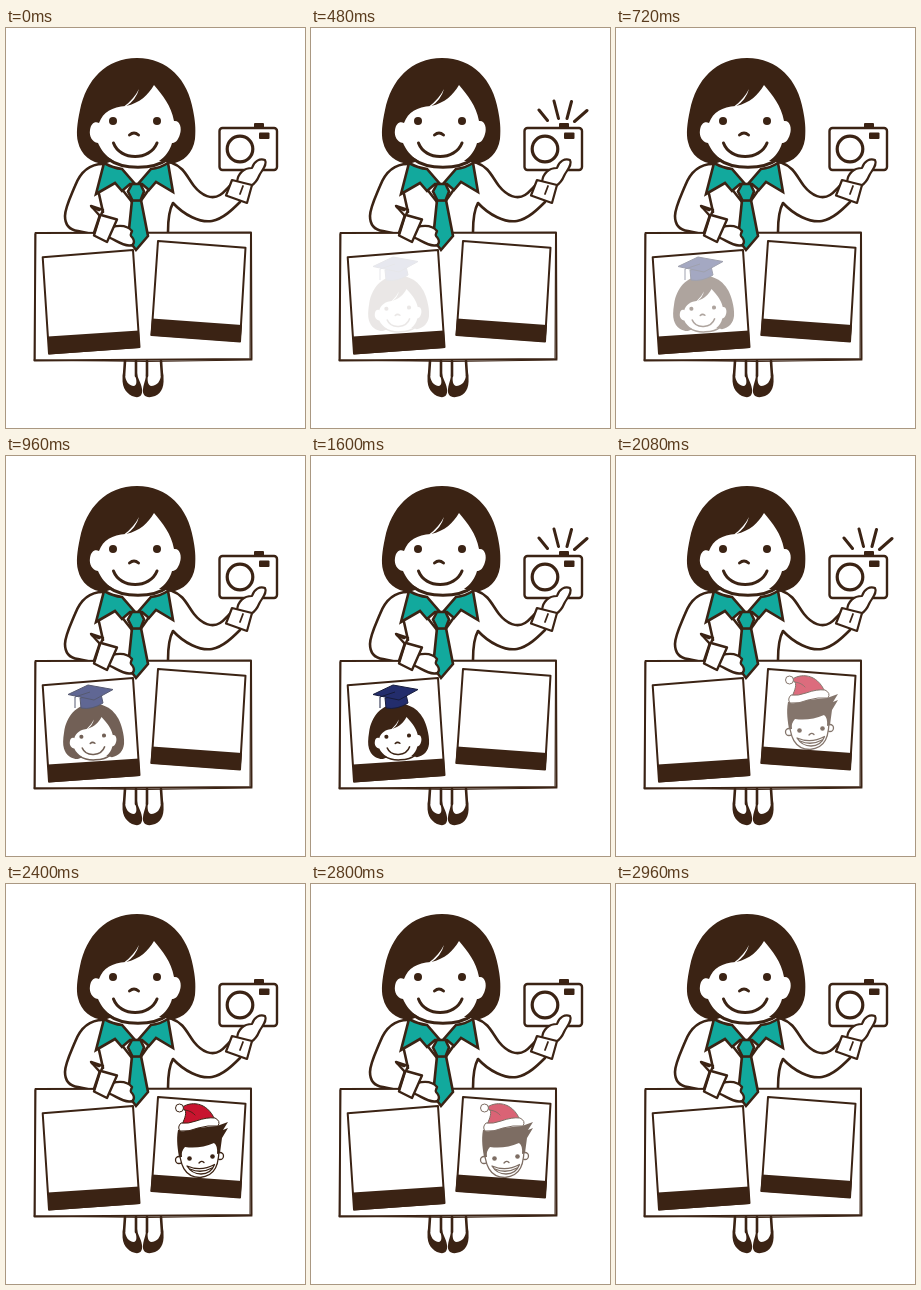
Recreate the animation shown at these times as an HTML page. Size 299x400 px, loop 3.04 s.

```html
<!DOCTYPE html>
<html lang="en">
<head>
<meta charset="utf-8">
<title>Photo booth</title>
<style>
  html, body { margin: 0; width: 100%; height: 100%; overflow: hidden; background: #fff; }
  svg { display: block; width: 299px; height: 400px; }
  .line { fill: none; stroke: #3b2314; stroke-width: 2.6; stroke-linecap: round; stroke-linejoin: round; }
  .sheet { fill: #fff; stroke: #3b2314; stroke-width: 2.4; stroke-linejoin: round; }
  .dark { fill: #3b2314; }
  .white { fill: #fff; }
  .teal { fill: #12a99d; stroke: #3b2314; stroke-width: 2.6; stroke-linejoin: miter; }
  .cap { fill: #222c6b; stroke: #151a3a; stroke-linejoin: round; }
  .thin { stroke-width: 1.3; }
  #flash, #girl, #boy { opacity: 0; }
</style>
</head>
<body>
<svg viewBox="0 0 299 400">
  <defs>
    <g id="head">
      <path class="dark" d="M131 30C100 30 80 52 74 82C71 96 70 106 72 114C75 127 85 135 98 136L107 133L157 133L164 136C178 134 187 125 189 111C190 100 189 92 187 82C182 52 162 30 131 30Z"/>
      <path class="white" d="M93 95C97 84 106 79 120 78C134 75 142 67 148 57C157 68 165 77 168 93C174 92 176 100 174 106C172 113 169 115 166 115C162 130 148 139 131 139C112 139 98 129 92 115C86 114 83 108 84 102C85 95 89 93 93 95Z"/>
      <path class="white" d="M118 78.500Q128 71 133 61Q130 72 120 78.500Z"/>
      <path class="line" style="stroke-width:3" d="M102 131C117 142 147 142 162 131M107.500 115C114 133 144 133 151 115M123.500 107Q128 103 132.500 107"/>
      <circle class="dark" cx="107" cy="93" r="4"/>
      <circle class="dark" cx="151" cy="93" r="4"/>
    </g>
  </defs>

  <!-- body -->
  <path class="line" d="M97 136C82 136 74 145 69 158C64 170 59 180 59 188C59 197 64 202 72 203L86 206M166 135C178 139 181 149 188 158C196 168 206 172 214 167C219 164 222 159 226 156M162 204C162 191 163 182 167 175C178 187 194 195 206 193C217 191 227 181 234 174M93 166L97 184"/>
  <path class="line" d="M115 160L126 174M146 157L134 174"/>
  <path class="teal" d="M98 135Q107 140 116 141L129 156L124 156L116 163L109 155L90 166Z"/>
  <path class="teal" d="M162 135Q154 140 145 141L132 156L136 156L143 162L150 154L167 164Z"/>
  <use href="#head"/>

  <!-- legs -->
  <path class="line" d="M119 333L118 348M130 333L130 348M141 333L141 348M155 333L156 348"/>
  <path class="dark" d="M117 345C115 358 119 364 126 368C133 371 137 368 136 361C135 354 132 352 131 345L129 347C131 353 131 357 128 358C123 358 119 353 119 346Z"/>
  <path class="dark" d="M157 345C159 358 156 365 149 368C141 371 136 368 137 361C138 354 140 352 140 345L142 347C141 353 142 357 145 358C151 358 155 353 155 346Z"/>

  <!-- board -->
  <path class="sheet" style="stroke-width:2" d="M29.500 205L245 204.500L245.500 331L28.500 332.500Z"/>
  <path class="line" style="stroke-width:1" d="M29 206L29 331M28 332L140 333.500L246 332M244.500 206L244 330"/>
  <path class="sheet" style="stroke-width:2" d="M36.700 229.300L127 222L133.500 319L43 325.500Z"/>
  <path class="dark" d="M42 308.500L133 302.500L134 320L42.500 326.500Z"/>
  <path class="sheet" style="stroke-width:2" d="M152 213L239.500 219.700L234 313.500L145.500 307Z"/>
  <path class="dark" d="M146 290.500L236 297L234.500 314L144.500 307.500Z"/>

  <!-- tie and left hand -->
  <path class="teal" d="M126 172L135 172L142 208L130 222L122 211Z"/>
  <path class="teal" d="M126 156L134.500 156L138 163.500L134.500 172.500L126.500 172.500L122 163.500Z"/>
  <path class="sheet" d="M106 199C114 197 122 198 126 203C125 206 124 207 125 208C130 213 128 218 123 217.500C115 217 110 212 102 209Z"/>
  <path class="sheet" d="M85 178L97 182L95 187L111 191.500L101 214L88 207.500L94 188Z"/>
  <path class="line" d="M86 179L93 182M94 187L88 205"/>

  <!-- camera and right hand -->
  <rect class="dark" x="248" y="95" width="10" height="6" rx="1"/>
  <rect class="sheet" x="213.500" y="100" width="57.500" height="42" rx="3"/>
  <rect class="dark" x="253" y="104.500" width="10.500" height="6.500" rx="1"/>
  <circle class="sheet" style="stroke-width:3.200" cx="234" cy="121" r="12.800"/>
  <path class="white" d="M231 155C232 145 238 140 246 140C248 133 254 130 259 132C262 137 255 143 253 148C251 154 248 157 245 159Z"/>
  <path class="line" style="stroke-width:2.200" d="M231 154C232 145 238 140 246 140C248 133 254 130 259 132C262 137 255 143 253 148C251 153 248 156 245 158"/>
  <path class="sheet" style="stroke-width:2.200" d="M226 152L246 157L241 175L220 167.500Z"/>
  <path class="line" style="stroke-width:1.800" d="M234 166L237 158"/>

  <path id="flash" class="line" style="stroke-width:3" d="M228 82L236.500 92.500M243 73L247.500 90.500M260.500 73.500L256 90.500M276 82.500L263.500 93.500"/>

  <!-- left print -->
  <g id="girl">
    <use href="#head" transform="translate(87 276) rotate(-3) scale(.515) translate(-130 -85)"/>
    <path class="cap" d="M74 242L75 252Q86 254 97 247L95 238Z"/>
    <path class="cap" d="M62 238.500L82 229L107 233.500L88 244Z"/>
    <path class="cap" style="fill:none" d="M84 236L69 241L69 252"/>
  </g>

  <!-- right print -->
  <g id="boy">
    <circle class="sheet thin" cx="173" cy="276" r="3.500"/>
    <circle class="sheet thin" cx="214" cy="272" r="3.500"/>
    <path class="sheet thin" d="M173 258C173 282 179 293 194 293.500C209 292 214 282 213 257Z"/>
    <path class="dark" d="M172 246C170 256 172 266 173 273L176 273Q175 267 179 263Q194 265 208 259Q212 262 211 270L214 269L216 254L222 244L217 246L222 238L211 242Z"/>
    <circle class="dark" cx="183.500" cy="274.500" r="2.300"/>
    <circle class="dark" cx="206.500" cy="272.500" r="2.300"/>
    <path class="line thin" d="M193 279Q195.500 276 198 278.500"/>
    <path class="sheet thin" d="M181 282Q195 288 208.500 280.500Q205 290 195 290Q186 290 181 282Z"/>
    <path class="line thin" d="M184 285Q195 290 206 284"/>
    <path fill="#c8142f" stroke="#3b2314" d="M175 224C184 217 201 217 209 236L175 243C178 236 181 230 179 226Z"/>
    <path class="line" style="stroke-width:.8" d="M179 226Q186 227 189 231"/>
    <circle class="sheet" style="stroke-width:1" cx="173.500" cy="224" r="4"/>
    <path class="sheet" style="stroke-width:1" d="M175 239Q182 240 190 237Q201 233 209 234Q215 237 212 242Q202 241 192 244Q183 248 174 247Q171 243 175 239Z"/>
  </g>
</svg>
<script>
  const LOOP = 3040;

  // Each entry: [time in ms, opacity]; a repeated time is a hard change.
  const blink = t => [
    [t, 0], [t, 1], [t + 200, 1], [t + 200, 0],
    [t + 360, 0], [t + 360, 1], [t + 520, 1], [t + 520, 0]
  ];
  const tracks = {
    flash: [...blink(400), ...blink(1600)],
    girl: [[400, 0], [1180, 1], [1600, 1], [1845, 0]],
    boy: [[1600, 0], [2370, 1], [2760, 1], [2760, .83], [2960, 0]]
  };

  for (const [id, steps] of Object.entries(tracks)) {
    const frames = [[0, 0], ...steps, [LOOP, 0]]
      .map(([t, opacity]) => ({ offset: t / LOOP, opacity }));
    const anim = document.getElementById(id)
      .animate(frames, { duration: LOOP, iterations: Infinity });
    anim.startTime = 0;
  }
</script>
</body>
</html>
```
